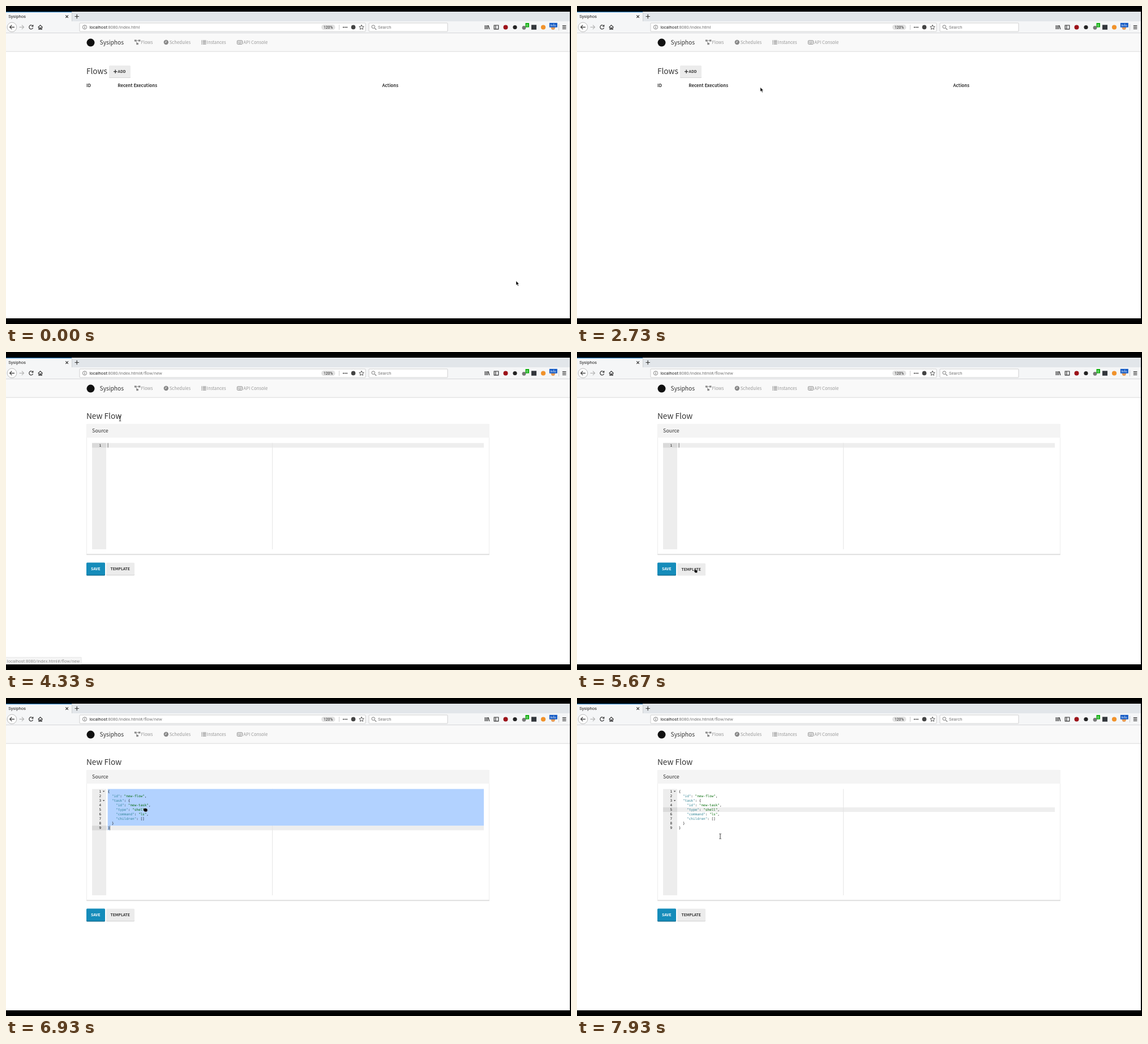
An HTML page that plays this animation: 998x561 px, repeating every 8000 ms.

```html
<!DOCTYPE html>
<html lang="en">
<head>
<meta charset="utf-8">
<title>Sysiphos</title>
<style>
  html, body { margin: 0; width: 100%; height: 100%; overflow: hidden; background: #000; }
  svg { display: block; width: 100%; height: 100%; }
  text { white-space: pre; }
  .ui { font: 7.65px Roboto, sans-serif; fill: #222; }
  .page { font: 7.8px "Noto Sans CJK JP", "Noto Sans CJK SC", "Noto Sans CJK", sans-serif; fill: #333; }
  .bold { font-weight: 700; }
  .title { font-size: 13.7px; }
  .button { font-size: 6.7px; font-weight: 700; }
  .nav { fill: #999; }
  .code { font: 6px "DejaVu Sans Mono", monospace; fill: #111; }
  .key { fill: #318495; }
  .string { fill: #036a07; }
  .line { fill: none; stroke: #333; stroke-width: 1.2; }
</style>
</head>
<body>
<svg viewBox="0 0 998 561" xmlns="http://www.w3.org/2000/svg">
  <rect width="998" height="561"/>
  <rect y="10" width="996" height="541" fill="#fff"/>

  <!-- Browser chrome -->
  <rect y="10" width="996" height="17" fill="#e2e6ea"/>
  <rect y="27" width="996" height="21" fill="#f5f6f7"/>
  <rect y="10" width="116" height="17" fill="#f5f6f7"/>
  <rect y="10" width="116" height="1.2" fill="#2a7fc0"/>
  <path d="M116.5 11V27M0 47.6H996" stroke="#c4c7ca" stroke-width=".7"/>
  <path class="line" d="M105.3 16.3l4.6 4.6m0-4.6l-4.6 4.6M121.5 18.5h7.4m-3.7-3.7v7.4"/>
  <circle cx="10.5" cy="37.3" r="8.3" fill="#fff" stroke="#a9a9a9" stroke-width=".8"/>
  <path class="line" d="M15 37.3H6.7m3.6-3.6l-3.6 3.6 3.6 3.6"/>
  <path class="line" style="stroke:#b4b4b4" d="M23.5 37.3h8m-3.6-3.6l3.6 3.6-3.6 3.6"/>
  <path class="line" d="M47.2 35.2a3.5 3.5 0 1 0 .4 3.3M47.8 33.2v2.8h-2.8M56.6 37.6l4-3.8 4 3.8M58 37v4.1h1.8v-2.4h1.6v2.4h1.8V37"/>
  <g fill="#fff" stroke="#c6c6c6" stroke-width=".8">
    <rect x="130" y="30" width="505" height="15" rx="1"/>
    <rect x="641" y="30" width="139" height="15" rx="1"/>
  </g>
  <circle cx="139" cy="37.3" r="3.6" fill="none" stroke="#666" stroke-width=".8"/>
  <path d="M139 36.6v2.8m0-4.5v1" stroke="#666"/>
  <rect x="557" y="32.8" width="24.5" height="9.2" rx="4.6" fill="#e2e2e2"/>
  <path d="M588.5 33v9M976.5 32v11" stroke="#c4c4c4" stroke-width=".8"/>
  <g fill="#444">
    <circle cx="596" cy="37.6" r="1.1"/><circle cx="599" cy="37.6" r="1.1"/><circle cx="602" cy="37.6" r="1.1"/>
    <circle cx="613.5" cy="37.4" r="3.8"/>
  </g>
  <path d="M628 33.3l1.2 2.7 3 .3-2.2 2 .6 2.9-2.6-1.5-2.6 1.5.6-2.9-2.2-2 3-.3z" fill="none" stroke="#444" stroke-width=".9"/>
  <path class="line" style="stroke:#777" d="M651.2 39.1l3 2.6"/>
  <circle cx="648.8" cy="36.6" r="2.8" fill="none" stroke="#777"/>
  <path class="line" d="M846.2 34v7m2.3-7v7m2.2-7v7m1.2-6.8l2 6.8M862.2 34h7.6v6.8h-7.6zM865 34v6.8M982.8 34.6h6.6m-6.6 2.8h6.6m-6.6 2.8h6.6"/>
  <circle cx="882.5" cy="37.5" r="4" fill="#9c1119"/>
  <circle cx="899" cy="37.5" r="3.6" fill="#222"/>
  <circle cx="915" cy="38.3" r="3.4" fill="#777"/>
  <rect x="917.5" y="30" width="6.5" height="7.5" fill="#10b010"/>
  <rect x="928" y="33.3" width="9" height="8.4" fill="#33373c"/>
  <circle cx="949" cy="37.5" r="4.1" fill="#f0922b"/>
  <circle cx="966.3" cy="38.3" r="3.6" fill="#e59b57"/>
  <rect x="959.8" y="29.8" width="14" height="7.8" fill="#1259c4"/>
  <g class="ui">
    <text x="4.2" y="21.2">Sysiphos</text>
    <text x="147.4" y="39.9">localhost<tspan id="path" fill="#777">:8080/index.html</tspan></text>
    <text x="561" y="39.7" font-size="6.7">120%</text>
    <text x="657" y="39.9" fill="#777">Search</text>
    <text x="919" y="36" font-size="6" style="fill:#fff">0</text>
    <text x="961.2" y="36" font-size="6" style="fill:#fff">Info</text>
  </g>

  <!-- Site navigation -->
  <rect y="48" width="996" height="32" fill="#f9f9f9"/>
  <rect y="79.5" width="996" height="1.5" fill="#e6e6e6"/>
  <circle cx="149.5" cy="64.6" r="7" fill="#111"/>
  <g class="page">
    <text x="165.6" y="68" font-size="10.2">Sysiphos</text>
    <text class="nav" x="238.4" y="66.9">Flows</text>
    <text class="nav" x="288.7" y="66.9">Schedules</text>
    <text class="nav" x="354.6" y="66.9">Instances</text>
    <text class="nav" x="419.3" y="66.9">API Console</text>
  </g>
  <g fill="#888">
    <path d="M226.8 59.5h3.6v3h-3.6zM233.8 59.5h3.6v3h-3.6zM230.2 65h3.6v3.2h-3.6z"/>
    <path d="M230 61h4M229.4 62l2 3.5" stroke="#888" stroke-width=".9"/>
    <circle cx="282.8" cy="64" r="4.2"/>
    <path d="M282.8 61.2v3.1h-2" fill="none" stroke="#f9f9f9" stroke-width=".9"/>
    <path d="M345 61h1.5m1 0h6M345 63.1h1.5m1 0h6M345 65.2h1.5m1 0h6M345 67.3h1.5m1 0h6" stroke="#888" stroke-width="1.1"/>
    <rect x="408.4" y="61" width="9" height="6.3" rx=".8" fill="none" stroke="#888"/>
    <path d="M409.8 63h6.4m-6.4 1.6h6.4m-5.4 1.4h4.4" stroke="#888" stroke-width=".9" stroke-dasharray="1 .5"/>
  </g>

  <!-- Flow list -->
  <g id="list" class="page">
    <text class="title" x="141.9" y="119.8">Flows</text>
    <rect x="182" y="108" width="38" height="19" rx="1.5" fill="#d6d6d6"/>
    <g id="add">
      <rect x="182" y="105" width="38" height="21" rx="1.5" fill="#ececec"/>
      <path d="M190 115.6h6.4m-3.2-3.2v6.4" stroke="#333" stroke-width="1.4"/>
      <text class="button" x="197.6" y="118.4">ADD</text>
    </g>
    <g class="bold">
      <text x="142" y="143">ID</text>
      <text x="197.2" y="143">Recent Executions</text>
      <text x="664.6" y="143">Actions</text>
    </g>
  </g>

  <!-- Flow editor -->
  <g id="form" class="page">
    <text class="title" x="141.9" y="118">New Flow</text>
    <rect x="142.4" y="127.4" width="711" height="230" rx="1.5" fill="#fff" stroke="#e8e8e8" stroke-width=".8"/>
    <rect x="142" y="127" width="712" height="24" fill="#f4f4f4"/>
    <rect x="142" y="356" width="712" height="2.2" rx="1" fill="#e2e2e2"/>
    <text x="152.1" y="142.3" font-size="8.9">Source</text>
    <rect x="152" y="160.6" width="25" height="187.4" fill="#ededed"/>
    <rect id="gutterRow" x="152" width="25" height="8.1" fill="#dadada"/>
    <rect id="activeRow" x="177" width="667" height="8.1" fill="#eee"/>
    <path d="M470.5 160.6V348" stroke="#e4e4e4" stroke-width=".9"/>
    <path id="selection" d="M179.6 160.6H844V225.2H183.2V233.2H179.6z" fill="#b2d2ff"/>
    <text class="code" x="168" y="166.8" text-anchor="end">1</text>
    <g id="code" class="code"></g>
    <rect id="caret" width=".8" height="8" fill="#555"/>
    <rect x="142" y="374" width="33" height="20.4" rx="1.5" fill="#0f6c91"/>
    <rect x="142" y="371.6" width="33" height="21.4" rx="1.5" fill="#158cba"/>
    <text class="button" x="150" y="385" style="fill:#fff">SAVE</text>
    <rect x="177" y="375" width="50" height="19.2" rx="1.5" fill="#d6d6d6"/>
    <g id="template">
      <rect x="177" y="371.8" width="50" height="21.2" rx="1.5" fill="#ececec"/>
      <text class="button" x="184.5" y="385">TEMPLATE</text>
    </g>
  </g>

  <g id="status">
    <rect x="-1" y="538.8" width="134" height="12.2" fill="#ececec" stroke="#bbb" stroke-width=".7"/>
    <text class="ui" x="1.8" y="547.7">localhost:8080/index.html#/flow/new</text>
  </g>

  <g id="pointer">
    <path id="arrow" d="M0 0V7.6L1.8 6 3.1 9 4.4 8.4 3.1 5.5H5.4z" fill="#000" stroke="#fff" stroke-width=".5"/>
    <path id="hand" d="M0 .3q.7-.7 1.4 0V3l3.2.7q.9.3.7 1.4L4.7 8H1.2L-.9 4.8q.2-.8.9-.3z" fill="#000" stroke="#fff" stroke-width=".4"/>
    <path id="fist" d="M-3.2-1.5q.8-1.5 2-1.6 3 0 4.7 1.3.9 1 .2 2.6L2.7 3.2H-1L-3.3.6z" fill="#000" stroke="#fff" stroke-width=".4"/>
    <path id="beam" d="M-1.7-4.3H-.5L0-3.8.5-4.3H1.7M0-3.8V3.8M-1.7 4.3H-.5L0 3.8.5 4.3H1.7" fill="none" stroke="#222" stroke-width=".9"/>
  </g>
</svg>
<script>
const LOOP = 8000, ROW = 8.08, TOP = 160.6, CHAR = 3.61;
const OPENED = 4200, FILLED = 6000, CLICKED = 7000;

const el = id => document.getElementById(id);
const show = (id, visible) => el(id).style.display = visible ? "" : "none";
const place = (id, x, y) => el(id).setAttribute("transform", `translate(${x} ${y})`);
const within = (t, from, to) => t >= from && t < to;

const source = `{
  "id": "new-flow",
  "task": {
    "id": "new-task",
    "type": "shell",
    "command": "ls",
    "children": []
  }
}`;

el("code").innerHTML = source.split("\n").map((line, i) => {
  const y = 166.8 + i * ROW, indent = line.search(/\S/);
  const colored = line.trim().replace(/"[^"]*"(:?)/g, (token, colon) =>
    `<tspan class="${colon ? "key" : "string"}">${token.replace(":", "")}</tspan>${colon}`);
  const number = i ? `<text x="168" y="${y}" text-anchor="end">${i + 1}</text>` : "";
  const fold = line.endsWith("{") ? `<path d="M170.8 ${y - 3}h3.6l-1.8 2.2z" fill="#555"/>` : "";
  return `${number}${fold}<text x="${179.7 + indent * CHAR}" y="${y}">${colored}</text>`;
}).join("");

// Pointer route: time, x, y
const route = [
  [0, 901, 485], [70, 901, 485], [250, 950, 380], [430, 970, 150], [550, 900, 40],
  [650, 560, 20], [760, 145, 14], [870, 125, 60], [930, 172, 100], [1100, 500, 132],
  [1300, 900, 125], [1450, 964, 80], [1580, 930, 34], [1730, 870, 31], [1900, 600, 20],
  [2100, 250, 21], [2250, 165, 50], [2400, 176, 125], [2600, 318, 143], [2730, 324, 143.5],
  [2900, 300, 142], [3200, 215, 136], [3400, 172, 118], [3500, 175, 114], [3730, 207.5, 119],
  [4130, 207.5, 119], [4270, 201.5, 117.5], [4350, 201.5, 117.5], [4550, 240, 76],
  [4700, 278, 120], [4950, 250, 250], [5200, 212, 366], [5600, 207.5, 381.5],
  [6130, 207.5, 381.5], [6400, 225, 300], [6800, 246, 197.5], [7070, 246, 197.5],
  [7550, 253, 244], [LOOP, 253, 244]
];

function pointerAt(t) {
  const i = route.findIndex(point => point[0] > t);
  const [t0, x0, y0] = route[i - 1], [t1, x1, y1] = route[i];
  const k = (t - t0) / (t1 - t0);
  return [x0 + (x1 - x0) * k, y0 + (y1 - y0) * k];
}

function pointerShape(t) {
  if (within(t, 3530, OPENED) || within(t, 5270, 6200)) return "hand";
  if (within(t, 6600, 7070)) return "fist";
  return t < OPENED ? "arrow" : "beam";
}

function draw(t) {
  const opened = t >= OPENED, filled = t >= FILLED, clicked = t >= CLICKED;
  show("list", !opened);
  show("form", opened);
  show("code", filled);
  show("selection", filled && !clicked);
  el("path").textContent = ":8080/index.html" + (opened ? "#/flow/new" : "");

  const row = clicked ? 4 : filled ? 8 : 0;
  const y = TOP + row * ROW;
  for (const id of ["gutterRow", "activeRow", "caret"]) el(id).setAttribute("y", y);
  el("caret").setAttribute("x", clicked ? 245.4 : filled ? 183 : 179.7);
  show("caret", t < 7930);

  place("add", 0, within(t, 3530, OPENED) ? 1 : 0);
  place("template", 0, within(t, 5270, 6200) ? 1 : 0);
  el("status").style.opacity = t < 3600 ? 0 : Math.max(0, Math.min(1, (4460 - t) / 260));

  place("pointer", ...pointerAt(t));
  const shape = pointerShape(t);
  for (const id of ["arrow", "hand", "fist", "beam"]) show(id, id === shape);
}

const start = performance.now();
function tick() {
  draw((performance.now() - start) % LOOP);
  requestAnimationFrame(tick);
}
tick();
</script>
</body>
</html>
```
